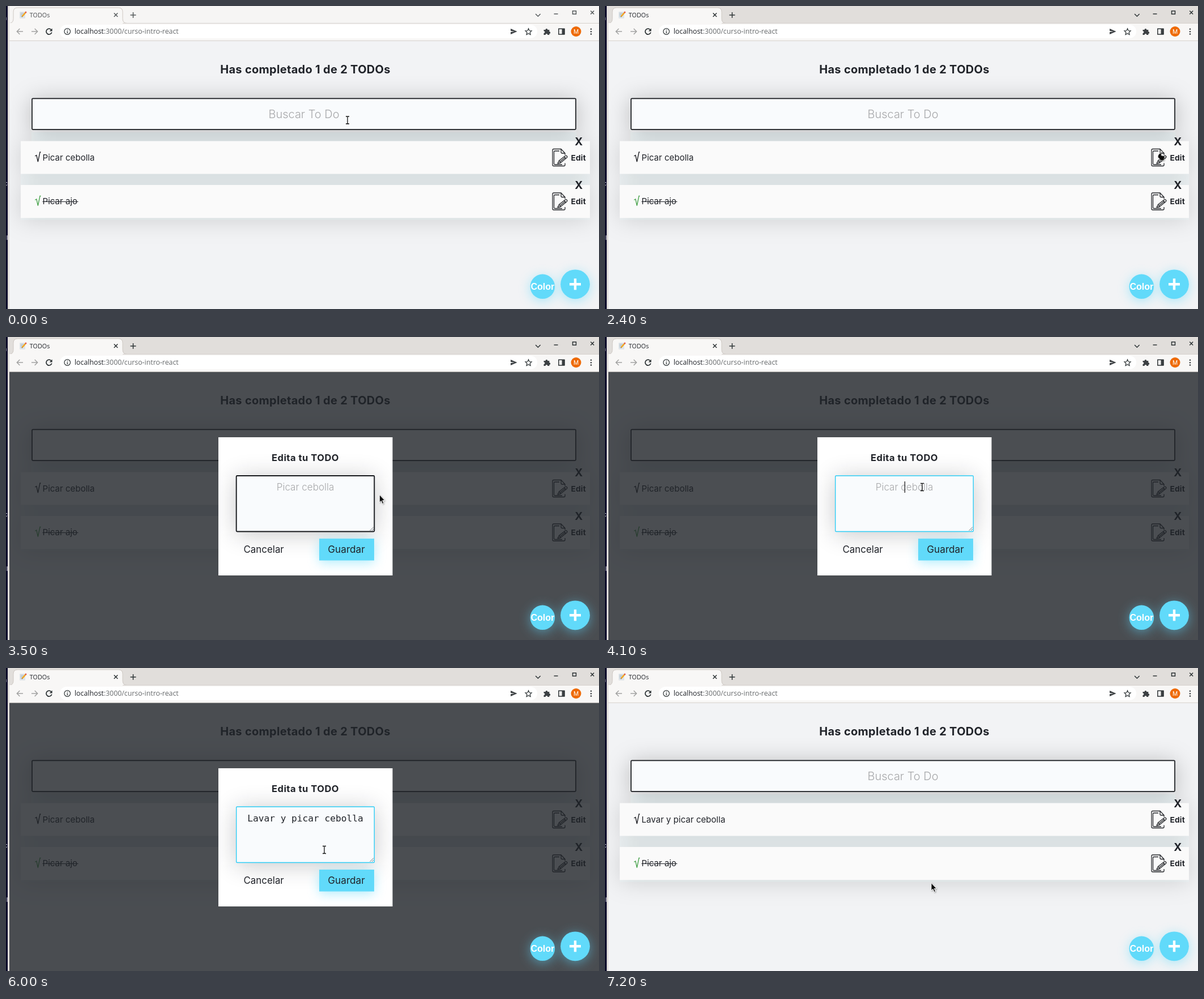
An HTML page for the animation above (8 s loop, 1047 px wide and 535 px high).

```html
<!DOCTYPE html>
<html lang="es">
<head>
<meta charset="utf-8">
<title>TODOs</title>
<style>
  html, body { margin: 0; width: 100%; height: 100%; overflow: hidden; background: #f2f3f5; }
  svg { display: block; width: 1047px; height: 535px; cursor: default; }
  text { font-family: Inter, sans-serif; fill: #202329; white-space: pre; }
  .ui { font-family: "Open Sans", "Noto Sans", sans-serif; }
  .mono { font-family: "DejaVu Sans Mono", monospace; font-size: 16.2px; }
  .mid { text-anchor: middle; }
  .bold { font-weight: 700; }
  .hint { fill: #a6a7a9; font-weight: 300; }
  .line { fill: none; stroke: #2e3436; stroke-width: 1.5; }
  .pen { fill: none; stroke: #25272b; stroke-width: 1.3; stroke-linejoin: round; }
</style>
</head>
<body>
<svg viewBox="0 0 1047 535">
  <defs>
    <filter id="soft" filterUnits="userSpaceOnUse" x="-80" y="60" width="1210" height="480"><feGaussianBlur stdDeviation="21"/></filter>
    <filter id="glow" x="-100%" y="-100%" width="300%" height="300%"><feGaussianBlur stdDeviation="10"/></filter>
    <filter id="cast" x="-50%" y="-50%" width="220%" height="220%"><feDropShadow dx="1" dy="1.2" stdDeviation="1" flood-opacity=".35"/></filter>
    <clipPath id="page"><rect x="6" y="61" width="1041" height="474"/></clipPath>
    <clipPath id="card"><rect x="375" y="177" width="307.5" height="244"/></clipPath>

    <g id="rowTools">
      <text class="bold mid" x="1011.3" y="245.6" font-size="19">X</text>
      <text class="bold" x="997.5" y="272.5" font-size="13.7" letter-spacing=".2">Edit</text>
      <g class="pen">
        <path d="M987 263v-3l-7-7.5h-13q-2 0-2 2v26q0 2 2 2h18q2 0 2-2v-3"/>
        <path d="M980 252.5v5.5q0 2 2 2h5M982 280h-13q-1.500 0-1.500-1.500v-21q0-1.500 1.500-1.500h8"/>
        <path fill="#fafafa" d="M974 278l2.500-5 11-8.500q1.500-1 2.800.5t-.3 3l-11 9z"/>
        <path d="M976.500 273l2.800 4M978 275l10-8M985.500 266l2.800 4"/>
      </g>
    </g>
    <path id="tick" d="M51.300 265l2.600-1.500 2.500 11.500 3.600-17h1.400" fill="none" stroke-width="1.3"/>
  </defs>

  <g clip-path="url(#page)">
    <rect x="6" y="61" width="1041" height="474" fill="#f2f3f5"/>
    <g fill="#202329" filter="url(#soft)">
      <rect x="45" y="167" width="962" height="56" opacity=".25"/>
      <rect x="26" y="242.500" width="1005" height="58" opacity=".15"/>
      <rect x="26" y="320" width="1005" height="58" opacity=".15"/>
    </g>
    <text class="bold mid" x="528.500" y="119" font-size="20" letter-spacing=".3">Has completado 1 de 2 TODOs</text>
    <rect x="46" y="163.300" width="960" height="54.800" rx="1.500" fill="#f9fbfd" stroke="#17191d" stroke-width="1.700"/>
    <text class="hint mid" x="526" y="198" font-size="20">Buscar To Do</text>
    <g fill="#fafafa">
      <rect x="26" y="238.500" width="1005" height="58"/>
      <rect x="26" y="316" width="1005" height="58.300"/>
    </g>
    <use href="#tick" stroke="#17191d"/>
    <use href="#tick" y="77.500" stroke="#43a047"/>
    <text id="task" x="64.500" y="272.600" font-size="15.100"></text>
    <text x="64.500" y="350" font-size="15.100">Picar ajo</text>
    <path d="M64.500 345.500h63" stroke="#202329" stroke-width="1.100"/>
    <use href="#rowTools"/>
    <use href="#rowTools" y="77.500"/>

    <g id="modal">
      <rect x="6" y="61" width="1041" height="474" fill="#202329" opacity=".8"/>
      <rect x="375" y="177" width="307.500" height="244" fill="#fff"/>
      <g clip-path="url(#card)">
        <rect x="406" y="248" width="245" height="100" fill="#202329" opacity=".25" filter="url(#soft)"/>
        <rect x="553" y="360" width="97" height="38.500" fill="#61dafa" opacity=".5" filter="url(#glow)"/>
      </g>
      <text class="bold mid" x="528.500" y="219" font-size="16.500" letter-spacing=".5">Edita tu TODO</text>
      <rect id="field" x="406.700" y="245" width="243.600" height="98.500" rx="1.500" fill="#f9fbfd"/>
      <path d="M642.500 342l6.500-6.500M646 342l3-3" stroke="#77797c" stroke-width="1"/>
      <text id="hint" class="hint mid" x="528.500" y="271" font-size="17">Picar cebolla</text>
      <text id="typed" class="mono mid" x="528.500" y="271">Lavar y picar cebolla</text>
      <rect id="caret" y="255" width="1.200" height="20" fill="#111"/>
      <text x="419.500" y="381" font-size="16.900">Cancelar</text>
      <rect x="553" y="356" width="97" height="38.500" fill="#61dafa"/>
      <text class="mid" x="601" y="381" font-size="17.200">Guardar</text>
    </g>

    <g fill="#61dafa">
      <circle cx="947" cy="499" r="22" opacity=".5" filter="url(#glow)"/>
      <circle cx="1005" cy="495" r="26" opacity=".5" filter="url(#glow)"/>
      <circle cx="947.300" cy="495.300" r="21.800"/>
      <circle cx="1005" cy="491.300" r="25.900"/>
    </g>
    <text class="bold mid" x="947.300" y="501" font-size="16" style="font-family:'Liberation Sans',sans-serif;fill:#fff">Color</text>
    <path d="M995 491.300h20M1005 481.300v20" stroke="#fff" stroke-width="4.400"/>
  </g>

  <g id="browser">
    <rect id="strip" x="6" width="1041" height="31"/>
    <path d="M5 30.500Q13 30.500 13 22.500V10.500Q13 3 20.500 3H198.500Q206 3 206 10.500V22.500Q206 30.500 214 30.500" fill="#f8f7f6" stroke="#cdc7c2"/>
    <rect x="6" y="30" width="1041" height="31" fill="#f8f7f6"/>
    <path d="M206 30.500H1047M6 61.300H1047" stroke="#d5d0cc"/>
    <rect x="95" y="33" width="843" height="24" rx="12" fill="#fff"/>
    <rect x="24" y="10" width="10" height="12" rx="1" fill="#dfe5ea"/>
    <path d="M25.500 13h6M25.500 15.500h5M25.500 18h3" stroke="#8fa0ad" stroke-width=".8"/>
    <path d="M28.500 18.500L35 11" stroke="#f3a51c" stroke-width="2.600"/>
    <path d="M34.200 12l1.600-1.800" stroke="#e05a5a" stroke-width="2.600"/>
    <path d="M27.500 19.700l.7-1.700 1 1z" fill="#444"/>
    <g id="title">
      <text class="ui" x="41.800" y="20" font-size="10.800">TODOs</text>
      <path class="line" d="M190.700 12.500l6.500 6.500m0-6.500l-6.500 6.500M224.500 11v10m-5-5h10M935 14l4.300 4.300 4.300-4.300M967.500 14h7M1000.500 8.800h6v5.400h-6zM1032.200 8.500l6 6m0-6l-6 6"/>
    </g>
    <path class="line" stroke-width="1.600" d="M30 45H19.500m4.800-5l-5 5 5 5M45 45h10.500m-4.800-5l5 5-5 5" style="stroke:#a3a3a2"/>
    <path class="line" d="M80.300 42.500a5 5 0 1 0 .5 4" style="stroke-width:1.800"/>
    <path d="M81.600 39.500v5h-5z" fill="#2e3436"/>
    <circle class="line" cx="108.300" cy="45" r="5.300" style="stroke-width:1.200"/>
    <path class="line" d="M108.300 44.300v4M108.300 41.700v1.400" style="stroke-width:1.300"/>
    <text class="ui" x="121" y="49.300" font-size="12.350">localhost<tspan fill="#686b6d">:3000/curso-intro-react</tspan></text>
    <g fill="#3c4043">
      <path d="M891 40l11.500 5L891 50v-4l7-1-7-1z"/>
      <path d="M949.500 42h3a1.900 1.900 0 1 1 3.800 0h3v3.200a1.900 1.900 0 1 1 0 3.800v2h-3a1.900 1.900 0 0 0-3.800 0h-3v-3a1.900 1.900 0 0 0 0-3.800z"/>
      <path d="M981.500 40h5v10h-5z"/>
      <circle cx="1033" cy="40.800" r="1.300"/><circle cx="1033" cy="45.200" r="1.300"/><circle cx="1033" cy="49.600" r="1.300"/>
    </g>
    <path class="line" d="M975.800 40.200h10v9.800h-10z"/>
    <path class="line" d="M922.500 39.800l1.600 3.700 4 .3-3 2.700.9 4-3.500-2.100-3.500 2.100.9-4-3-2.700 4-.3z" style="stroke-width:1.200"/>
    <circle cx="1006.500" cy="45" r="9" fill="#ee6a05"/>
    <text class="mid" x="1006.500" y="49" font-size="10.500" style="font-family:Roboto,sans-serif;fill:#fff">M</text>
  </g>

  <rect width="3" height="535" fill="#0d0b2b"/>
  <rect x="3" width="3" height="535" fill="#dedbd8"/>
  <path d="M0 20v5M0 311.500q2 0 2 1M0 316.500q2 0 2-1M2 405v8" stroke="#e8e8f0" fill="none"/>

  <g id="pointer">
    <path id="arrow" filter="url(#cast)" d="M0 0V13.500L3 10.800 5.200 16 7.500 15 5.300 10H9.400z" fill="#111" stroke="#fff" stroke-width=".9"/>
    <path id="beam" d="M-3-6.500h2.200L0-6 .8-6.500H3M0-6V6M-3 6.500h2.200L0 6l.8.5H3" fill="none" stroke="#111" stroke-width="1.300"/>
    <path id="hand" filter="url(#cast)" d="M-1.400.5Q0-1 1.200.5V4l5.300 1Q7 5.200 7 7L6 10v2.500h-7V10.500L-4.800 7Q-5-.2 5.500-3.300 5.400L-1.400 7z" fill="#111" stroke="#fff" stroke-width=".5"/>
  </g>
</svg>
<script>
const LOOP = 8000, STEP = 100;
const OPEN = 2900, CLOSE = 7200, FOCUS = 4100, BLUR = 7000, PASTE = 5300;
const el = id => document.getElementById(id);
const show = (id, on) => el(id).setAttribute("display", on ? "inline" : "none");
const within = (t, from, to) => t >= from && t < to;

// Pointer legs: first step, last step, target, ease-out power, optional bend
const legs = [
  { from: 100, to: 800, at: [919, 272], power: 1.2, bend: [740, 400] },
  { from: 1100, to: 1600, at: [981, 260], power: 1.5 },
  { from: 2900, to: 3300, at: [699, 284], power: 2.4 },
  { from: 3500, to: 3900, at: [560, 265], power: 1.5 },
  { from: 5600, to: 6000, at: [562, 321], power: 1 },
  { from: 6100, to: 6400, at: [623, 384], power: 1 },
  { from: 6500, to: 6500, at: [576, 379.5], power: 1 }
];

function pointerAt(t) {
  let pos = [603, 201.5];
  for (const { from, to, at, power, bend } of legs) {
    if (t < from) break;
    const k = Math.min(1, (t - from + STEP) / (to - from + STEP));
    const p = 1 - (1 - k) ** power, q = 1 - p;
    pos = pos.map((start, i) => {
      const mid = bend ? bend[i] : (start + at[i]) / 2;
      return q * q * start + 2 * q * p * mid + p * p * at[i];
    });
  }
  return pos;
}

function pointerKind([x, y], modal, closed) {
  const over = (x0, y0, x1, y1) => x >= x0 && x <= x1 && y >= y0 && y <= y1;
  if (modal) {
    if (over(406, 244, 651, 344)) return "beam";
    return over(553, 356, 650, 394) ? "hand" : "arrow";
  }
  if (over(45, 162, 1007, 219)) return "beam";
  return !closed && over(963, 252, 1026, 283) ? "hand" : "arrow";
}

function draw(time) {
  const t = Math.floor(time % LOOP / STEP) * STEP;
  const modal = within(t, OPEN, CLOSE), active = t >= 2400;
  const focused = within(t, FOCUS, BLUR), pasted = t >= PASTE;

  el("strip").setAttribute("fill", active ? "#e1dedb" : "#f6f5f4");
  el("title").setAttribute("opacity", active ? 1 : .8);
  el("task").textContent = t >= CLOSE ? "Lavar y picar cebolla" : "Picar cebolla";

  show("modal", modal);
  show("hint", !pasted);
  show("typed", pasted);
  el("field").setAttribute("stroke", focused ? "#2fcdf5" : "#17191d");
  el("field").setAttribute("stroke-width", focused ? 1.4 : 1.9);
  show("caret", within(t, FOCUS, 4700) || within(t, 5200, 5800));
  el("caret").setAttribute("x", pasted ? 630 : 528.8);

  const pos = pointerAt(t), kind = pointerKind(pos, modal, t >= CLOSE);
  el("pointer").setAttribute("transform", `translate(${pos})`);
  for (const id of ["arrow", "beam", "hand"]) show(id, id === kind);
}

const begin = performance.now();
function tick() {
  draw(performance.now() - begin);
  requestAnimationFrame(tick);
}
tick();
</script>
</body>
</html>
```
